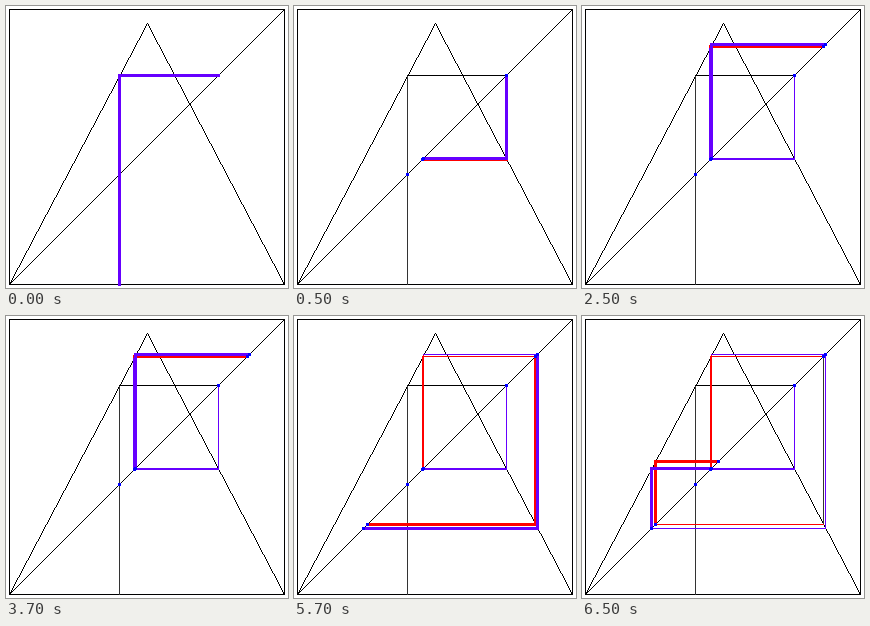
These frames come from a looping animation (282x282 px, 8 s). An HTML page with a canvas:

```html
<!DOCTYPE html>
<html lang="en">
<head>
<meta charset="utf-8">
<title>Tent map cobweb</title>
<style>
  html, body { margin: 0; height: 100%; overflow: hidden; background: #fff; }
  canvas { display: block; }
</style>
</head>
<body>
<canvas id="stage" width="282" height="282"></canvas>
<script>
const ctx = document.getElementById('stage').getContext('2d');
const LOOP = 8000, CUTS = [500, 2500, 4500, 6500];
const LOW = 3, HIGH = 278, SUM = LOW + HIGH;
const VIOLET = '#6600ff', RED = '#ff0000', BLUE = '#0000ff', BLACK = '#000', GREY = '#333';

// Two nearby orbits of the map, as x positions on the diagonal
const main = [113, 212, 129, 243, 69, 129];
const twin = [113, 212, 128, 241, 73, 136];

// Colours of finished legs: [vertical, horizontal]
const mainThin = [[GREY, BLACK], [VIOLET, VIOLET], [RED, VIOLET], [VIOLET, VIOLET]];
const twinThin = [[GREY, BLACK], [VIOLET, VIOLET], [RED, RED], [GREY, RED]];

// Unsmoothed line drawn with a square pen
function line(x1, y1, x2, y2, color = BLACK, pen = 1) {
  const n = Math.max(Math.abs(x2 - x1), Math.abs(y2 - y1), 1);
  const r = (pen - 1) / 2;
  ctx.fillStyle = color;
  for (let i = 0; i <= n; i++) {
    const x = Math.round(x1 + (x2 - x1) * i / n);
    const y = Math.round(y1 + (y2 - y1) * i / n);
    ctx.fillRect(x - r, y - r, pen, pen);
  }
}

function leg(orbit, k, [vertical, horizontal], pen) {
  const x = orbit[k], next = orbit[k + 1], y = SUM - next;
  line(x, k ? SUM - x : HIGH, x, y, vertical, pen);
  line(x, y, next, y, horizontal, pen);
}

function draw(step) {
  ctx.fillStyle = '#fff';
  ctx.fillRect(0, 0, 282, 282);

  line(LOW, LOW, HIGH, LOW);
  line(LOW, HIGH, HIGH, HIGH);
  line(LOW, LOW, LOW, HIGH);
  line(HIGH, LOW, HIGH, HIGH);
  line(LOW, HIGH, HIGH, LOW);
  line(LOW, HIGH, 141, 17);
  line(141, 17, HIGH, HIGH);

  for (let k = 0; k < step; k++) {
    leg(main, k, mainThin[k], 1);
    leg(twin, k, twinThin[k], 1);
  }
  leg(twin, step, [step === 2 ? VIOLET : RED, RED], 3);
  leg(main, step, [VIOLET, VIOLET], 3);

  if (!step) return;
  for (const orbit of [twin, main])
    for (const x of orbit.slice(0, step + 2)) line(x, SUM - x, x, SUM - x, BLUE, 3);
}

let shown = -1;
function tick() {
  const t = performance.now() % LOOP;
  const step = CUTS.filter(cut => t >= cut).length;
  if (step !== shown) draw(shown = step);
  requestAnimationFrame(tick);
}
tick();
</script>
</body>
</html>
```
